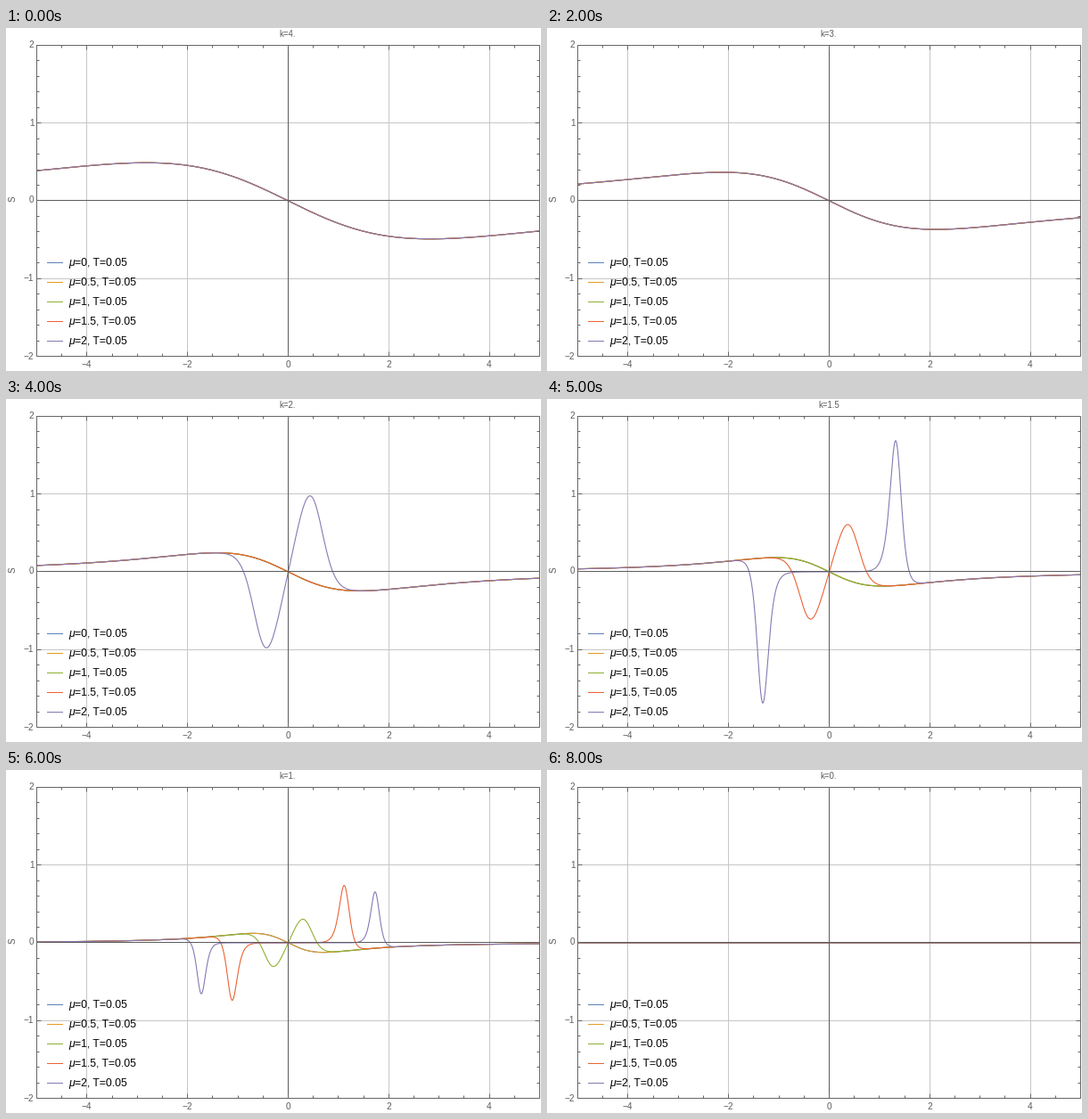
These frames come from a looping animation (600x385 px, 8.5 s). A matplotlib script:

```python
import numpy as np
import matplotlib.pyplot as plt
from matplotlib.animation import FuncAnimation
from matplotlib.patches import Rectangle

W, H, DPI = 600, 385, 100
PX = 72 / DPI                      # points per pixel
LEFT, RIGHT, TOP, BOTTOM = 34.5, 598.5, 19.5, 368.5
X0, Y0 = (LEFT + RIGHT) / 2, (TOP + BOTTOM) / 2
SX, SY = (RIGHT - LEFT) / 10, (BOTTOM - TOP) / 4
GREY, GRID, INK = "0.4", "0.78", "0.36"
TEMP = 0.05
MUS = (0, 0.5, 1, 1.5, 2)
COLORS = (
    (0.368, 0.507, 0.710),
    (0.881, 0.611, 0.142),
    (0.560, 0.692, 0.195),
    (0.923, 0.386, 0.209),
    (0.528, 0.471, 0.701),
)
STEPS = 17

fig = plt.figure(figsize=(W / DPI, H / DPI), dpi=DPI, facecolor="white")
ax = fig.add_axes([0, 0, 1, 1])
ax.set_xlim(0, W)
ax.set_ylim(H, 0)
ax.axis("off")


def px(x):
    return X0 + SX * x


def py(y):
    return Y0 - SY * y


def mid(v):
    """Centre of the pixel that holds v."""
    return np.ceil(v) - 0.5


def line(xs, ys, color=GREY, width=1, z=5):
    return ax.plot(xs, ys, color=color, lw=width * PX, zorder=z, snap=False,
                   solid_capstyle="butt", solid_joinstyle="miter")[0]


def label(x, y, text, size, color=INK, **kw):
    return ax.text(x, y, text, fontsize=size * PX, color=color,
                   family="Liberation Sans", zorder=6, **kw)


def signed(n):
    return str(n).replace("-", "\u2212")


def fermi(e, mu):
    return 0.5 * (1 - np.tanh((e - mu) / (2 * TEMP)))


def response(x, k, mu):
    """(k^3 / pi) d/dx [(f(-E) - f(E)) / E] with E = sqrt(x^2 + k^2)."""
    if k == 0:
        return np.zeros_like(x)
    e = np.hypot(x, k)
    up, down = fermi(e, mu), fermi(-e, mu)
    slope = (up * (1 - up) + down * (1 - down)) / TEMP
    return k**3 / np.pi * (x / e**2 * slope - x / e**3 * (down - up))


def draw_grid():
    for x in (-4, -2, 2, 4):
        line([mid(px(x))] * 2, [TOP, BOTTOM], GRID, z=1)
    for y in (-1, 1):
        line([LEFT, RIGHT], [mid(py(y))] * 2, GRID, z=1)


def draw_frame():
    line([LEFT, RIGHT], [mid(Y0)] * 2, INK)
    line([mid(X0)] * 2, [TOP, BOTTOM], INK)
    line([LEFT, RIGHT, RIGHT, LEFT, LEFT], [TOP, TOP, BOTTOM, BOTTOM, TOP])
    for i in range(-9, 10):
        x, size = mid(px(i / 2)), 5 if i % 4 == 0 else 3
        line([x, x], [TOP, TOP + size])
        line([x, x], [BOTTOM, BOTTOM - size])
        y, size = mid(py(i / 5)), 5 if i % 5 == 0 else 3
        line([LEFT, LEFT + size], [y, y])
        line([RIGHT, RIGHT - size], [y, y])


def draw_labels():
    for x in (-4, -2, 0, 2, 4):
        label(px(x) - 0.5, 380.6, signed(x), 10, ha="center")
    for y in (-2, -1, 0, 1, 2):
        label(31.5, mid(py(y)) + 3, signed(y), 10, ha="right")
    label(7.2, 192, "S", 10, rotation=90, ha="center", va="center")


def draw_legend():
    for i, (mu, color) in enumerate(zip(MUS, COLORS)):
        y = 263 + 22 * i
        line([46, 64], [y + 0.5] * 2, color)
        label(70, y + 3.6, "\u03bc", 12.2, "black", style="italic")
        label(77, y + 3.6, f"={mu:g}, T={TEMP:g}", 12.2, "black")


draw_grid()
draw_frame()
draw_labels()
draw_legend()
title = label(X0 - 0.5, 10.2, "", 9.7, ha="center")

xs = np.linspace(-5, 5, 1401)
clip = Rectangle((LEFT, TOP), RIGHT - LEFT, BOTTOM - TOP,
                 transform=ax.transData)
curves = []
for i, color in enumerate(COLORS):
    curve = line(px(xs), np.full_like(xs, Y0), color, 1.1, 3 + 0.1 * i)
    curve.set_clip_path(clip)
    curves.append(curve)


def update(step):
    k = 4 - step / 4
    text = f"{k:g}"
    title.set_text("k=" + (text if "." in text else text + "."))
    for curve, mu in zip(curves, MUS):
        curve.set_ydata(py(response(xs, k, mu)))
    return [title, *curves]


anim = FuncAnimation(fig, update, frames=STEPS, interval=500,
                     repeat=True, repeat_delay=0, blit=False)
plt.show()
```
